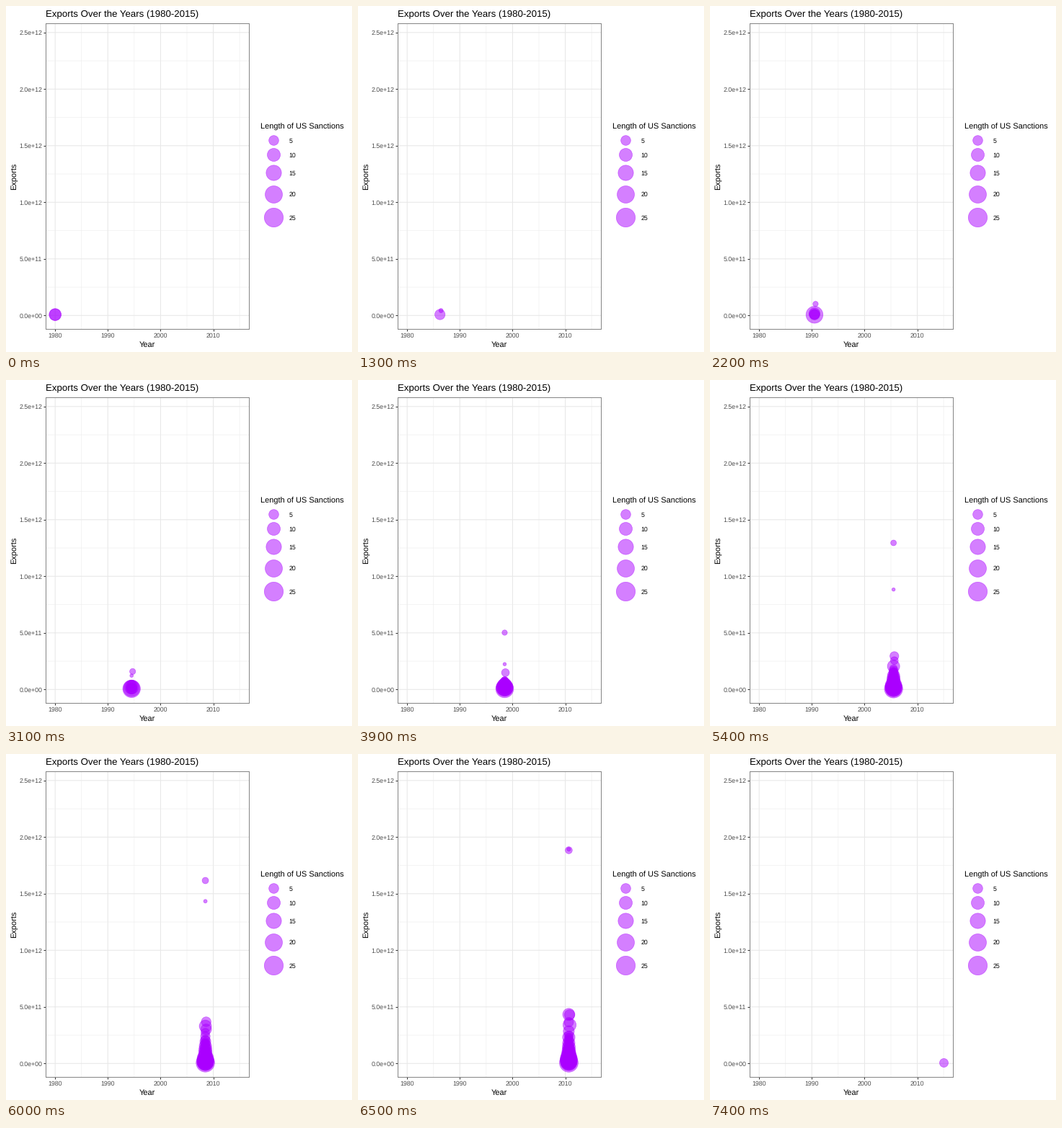
Recreate the animation shown at these times as a matplotlib script. Size 480 px wide and 480 px high, loop 7.5 s.

```python
import matplotlib.pyplot as plt
import numpy as np
from matplotlib.animation import FuncAnimation
from matplotlib.colors import to_rgba

SIZE, DPI = 480, 72          # one point is one pixel
FRAMES, STEP = 75, 100
BILLION = 1e9
PURPLE = to_rgba("#AA00FF", 0.5)
LEFT, RIGHT, TOP, BOTTOM = 55.4, 336.9, 23.6, 448.3

plt.rcParams.update({"font.family": "Liberation Sans", "text.hinting": "none"})

# Each year is reached on a whole frame; the years 1985-87 are bridged.
YEARS = np.array([y for y in range(36) if not 5 <= y <= 7])
KEYS = np.round(YEARS * (FRAMES - 1) / 35)

# Leading dots: (frame, exports in billions, radius)
LEADERS = [
    [(0, 7, 8.6), (10, 6, 10.4)],
    [(0, 8, 8.6), (13, 8, 7.5), (73, 10, 9)],
    [(14, 8, 11), (24, 6, 12.4), (73, 6, 13.5)],
    [(9, 30, 3.2), (13, 43, 3.3), (24, 115, 4.2), (32, 165, 4.5)],
    [(33, 215, 4.2), (40, 550, 4), (54, 1295, 4.3), (65, 1884, 5.2), (73, 2400, 5.2)],
    [(31, 122, 2.7), (54, 883, 2.7), (65, 1892, 3), (73, 2460, 4.8)],
]
MIDDLE = [46, 54, 65]
# Middle dots: exports at those three times, first and last radius
FOLLOWERS = [
    (244, 295, 430, 5.8, 7.5),
    (70, 205, 433, 9, 8.8),
    (145, 255, 340, 3, 9.5),
    (142, 161, 365, 4.5, 7),
    (110, 185, 285, 4, 8),
    (100, 150, 231, 5, 9),
]


def px(x, y):
    return x / SIZE, 1 - y / SIZE


def label(x, y, text, size, color="black", **kw):
    fig.text(*px(x, y), text, fontsize=size, color=color, va="baseline", **kw)


def radius(length):
    return 2.84 + 10.67 * np.sqrt((length - 1) / 24)


def leaders(f):
    for k, path in enumerate(LEADERS):
        t, value, r = zip(*path)
        if t[0] <= f <= t[-1]:
            v = np.interp(f, t, value)
            if k == 5 and f < 46:      # slow start, then a steep climb
                v = 122 + (f - 31) * 12.7
            elif k == 5 and f < 54:
                v = 313 + (f - 46) * 71
            yield (0.2 if k == 3 else 0), v, np.interp(f, t, r)


def followers(f):
    if f < 33:
        return
    growth = min(f / 46, 1) ** 3 * (1 + 0.03 * max(f - 65, 0))
    for k, (a, b, c, r0, r1) in enumerate(FOLLOWERS):
        shift = 0.15 if k in (0, 2) else 0
        yield (shift, growth * np.interp(f, MIDDLE, (a, b, c)),
               np.interp(f, (46, 65), (r0, r1)))


def crowd(f):
    """Dots piled up near zero, more and higher as time goes on."""
    count = int(np.interp(f, [14, 31, 46, 65, 73], [0, 5, 26, 44, 46]))
    reach = np.interp(f, [14, 31, 46, 65, 73], [5, 55, 105, 250, 320])
    for i in range(count):
        u = (i * 0.618 % 1) ** 2
        yield 0, 7 + u * reach, (13 - 5.5 * u) * (0.55 + 0.45 * (i * 0.414 % 1))


def dots(f):
    """Rows of year, exports and radius for one frame."""
    if f == FRAMES - 1:
        return np.array([(2015, 8 * BILLION, 6.4)])
    rows = np.array([*leaders(f), *followers(f), *crowd(f)])
    rows[:, 0] += 1980 + np.interp(f, KEYS, YEARS)
    rows[:, 1] *= BILLION
    return rows


fig = plt.figure(figsize=(SIZE / DPI, SIZE / DPI), dpi=DPI, facecolor="white")
ax = fig.add_axes([LEFT / SIZE, 1 - BOTTOM / SIZE,
                   (RIGHT - LEFT) / SIZE, (BOTTOM - TOP) / SIZE])
ax.set_xlim(1978.25, 2016.75)
ax.set_ylim(-0.121e12, 2.584e12)
ax.set_axisbelow(True)
ax.set_xticks(range(1980, 2011, 10))
ax.set_yticks(np.arange(6) * 5e11)
ax.set_xticks(range(1985, 2016, 10), minor=True)
ax.set_yticks(np.arange(5) * 5e11 + 2.5e11, minor=True)
ax.tick_params(which="major", length=2.75, width=1.07, color="#333333",
               labelbottom=False, labelleft=False)
ax.tick_params(which="minor", length=0)
ax.grid(which="major", color="#E8E8E8", lw=1.07)
ax.grid(which="minor", color="#EBEBEB", lw=0.53)
for axis in (ax.xaxis, ax.yaxis):
    for tick in axis.get_major_ticks() + axis.get_minor_ticks():
        tick.gridline.set_snap(False)
for spine in ax.spines.values():
    spine.set(color="#858585", linewidth=1)

label(LEFT, 15, "Exports Over the Years (1980-2015)", 13.2)
label(196, 473, "Year", 11, ha="center")
label(13.5, 236, "Exports", 11, ha="center", rotation=90, rotation_mode="anchor")
for k in range(4):
    label(68.2 + 73.1 * k, 460, str(1980 + 10 * k), 8.8, "#4D4D4D", ha="center")
for k in range(6):
    label(50.3, 432.5 - 78.5 * k, f"{k * 5e11:.1e}", 8.8, "#4D4D4D", ha="right")

label(353, 171, "Length of US Sanctions", 11)
for length, y in zip(range(5, 26, 5), (186, 206, 231.3, 260.5, 293)):
    fig.add_artist(plt.Line2D(*[[v] for v in px(370.5, y)], marker="o", ls="",
                              ms=2 * radius(length) - 0.7, mfc=PURPLE,
                              mec=PURPLE, mew=0.71))
    label(392.7, y + 3.7, str(length), 8.8)

points = ax.scatter([], [], facecolors=[PURPLE], edgecolors=[PURPLE],
                    linewidths=0.71, zorder=3)


def draw(f):
    rows = dots(f)
    points.set_offsets(rows[:, :2])
    points.set_sizes((2 * rows[:, 2] - 0.7) ** 2)
    return points,


anim = FuncAnimation(fig, draw, frames=FRAMES, interval=STEP,
                     repeat=True, repeat_delay=0)
plt.show()
```
